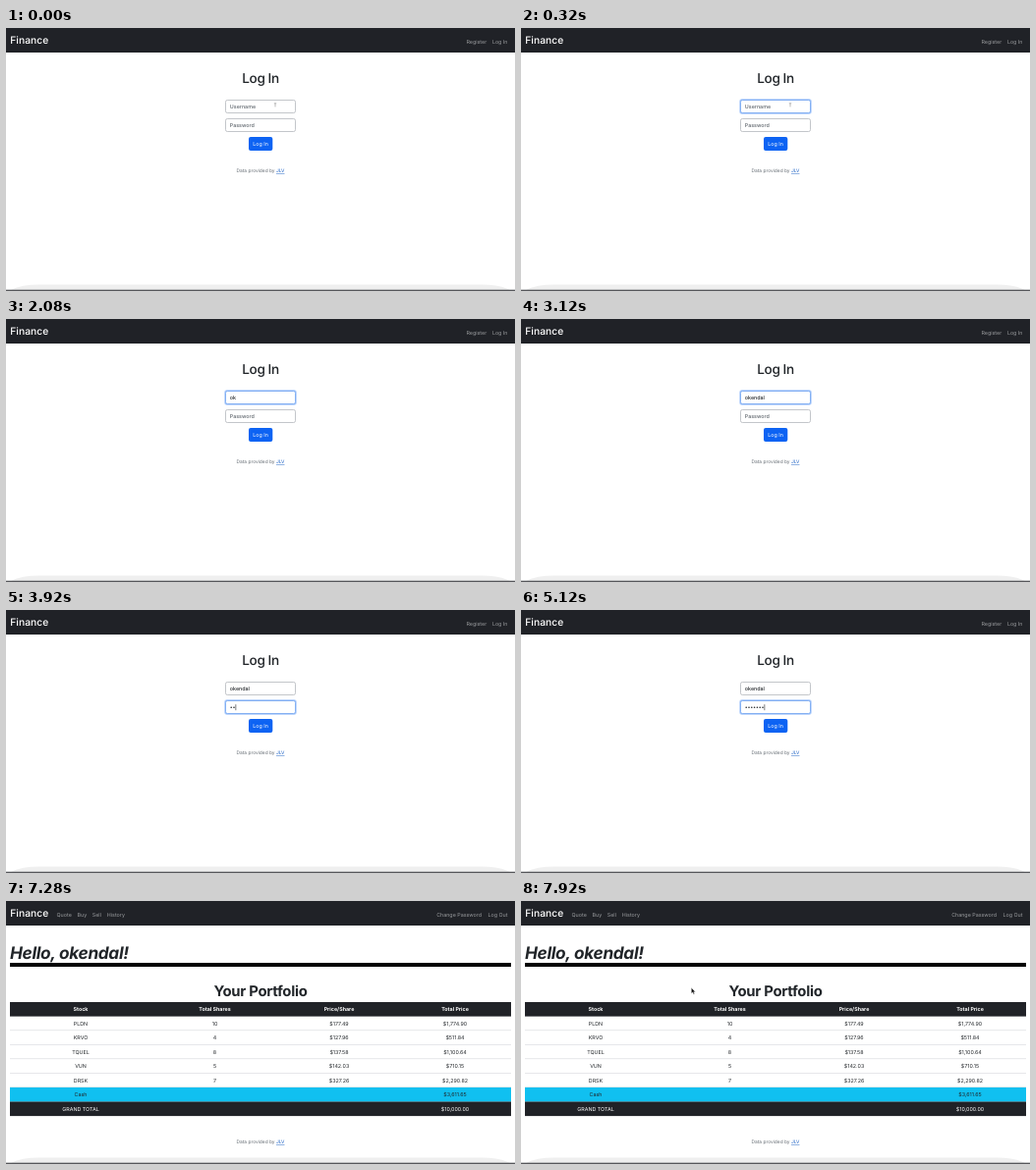
An HTML page for the animation above (8000 ms loop, 518x268 px).

```html
<!DOCTYPE html>
<html lang="en">
<head>
<meta charset="utf-8">
<title>Finance</title>
<style>
  html, body { margin: 0; width: 100%; height: 100%; overflow: hidden; background: #fff; }
  svg { display: block; width: 518px; height: 268px; }
  text { font: 400 5.35px Inter, Roboto, sans-serif; fill: #212529; text-rendering: geometricPrecision; white-space: pre; }
  .nav { fill: #9a9c9f; }
  .brand { font-size: 10.3px; font-weight: 500; fill: #fff; }
  .title { font-size: 13.6px; font-weight: 500; letter-spacing: -.03em; }
  .hello { font-size: 17.3px; font-weight: 700; font-style: italic; letter-spacing: -.02em; }
  .head { font-size: 14.9px; font-weight: 700; letter-spacing: -.02em; }
  .field { font-weight: 500; }
  .hint { fill: #5d646b; font-weight: 500; }
  .th { fill: #fff; font-weight: 700; }
  .light { fill: #fff; }
  .small { font-size: 4.85px; fill: #656c73; }
  .link { fill: #1a5fc4; text-decoration: underline; }
</style>
</head>
<body>
<svg id="stage" viewBox="0 0 518 268"></svg>
<script>
const LOOP = 8000, STEP = 80;
const USER = 'okendal', DARK = '#202227';
const stage = document.getElementById('stage');

function add(parent, tag, attrs, content = '') {
  const el = document.createElementNS('http://www.w3.org/2000/svg', tag);
  for (const key in attrs) el.setAttribute(key, attrs[key]);
  el.textContent = content;
  parent.append(el);
  return el;
}
const group = () => add(stage, 'g', {});
const rect = (g, x, y, width, height, fill, rx = 0) =>
  add(g, 'rect', { x, y, width, height, fill, rx });
const label = (g, x, y, cls, content, anchor = 'start') =>
  add(g, 'text', { x, y, class: cls, 'text-anchor': anchor }, content);
const show = (el, on) => el.setAttribute('visibility', on ? 'visible' : 'hidden');

function footer(g, y) {
  const line = label(g, 259, y, 'small', 'Data provided by ', 'middle');
  add(line, 'tspan', { class: 'link' }, 'JLV');
}

function input(g, y) {
  const ring = rect(g, 222.3, y - .7, 73.4, 15.4, '#a9c9fb', 2.6);
  const box = rect(g, 223.5, y + .5, 71, 13, '#fff', 1.8);
  box.setAttribute('stroke-width', .8);
  return amount => {
    ring.setAttribute('opacity', amount);
    box.setAttribute('stroke', amount > .5 ? '#6fa2f0' : '#b4b8bd');
  };
}

// Shared frame
rect(stage, 0, 0, 518, 25, DARK);
label(stage, 4.3, 16.2, 'brand', 'Finance');
add(stage, 'path', { d: 'M5 267Q16 261.6 34 261.6H484Q502 261.6 513 267Z', fill: '#efefef' });
rect(stage, 0, 266.7, 518, 1.3, '#55565a');

// Log in page
const login = group();
label(login, 468.5, 15.5, 'nav', 'Register');
label(login, 510.5, 15.5, 'nav', 'Log In', 'end');
label(login, 259, 56, 'title', 'Log In', 'middle');
const focusUser = input(login, 73);
const focusPass = input(login, 92);
const userHint = label(login, 227.8, 82, 'hint', 'Username');
const userText = label(login, 227.8, 82, 'field', '');
const passHint = label(login, 227.8, 101.2, 'hint', 'Password');
const dots = Array.from({ length: 9 }, (_, i) =>
  add(login, 'circle', { cx: 229.2 + i * 2.8, cy: 99.3, r: .8, fill: '#212529' }));
const caret = rect(login, 0, 96.2, .6, 6, '#212529');
rect(login, 247, 111, 24.3, 14, '#0d63f3', 2);
label(login, 259.1, 120, 'light', 'Log In', 'middle');
footer(login, 147);

// Portfolio page
const home = group();
[[51.5, 'Quote'], [72.6, 'Buy'], [87.8, 'Sell'], [102.8, 'History']]
  .forEach(([x, name]) => label(home, x, 15.5, 'nav', name));
label(home, 484, 15.5, 'nav', 'Change Password', 'end');
label(home, 510.5, 15.5, 'nav', 'Log Out', 'end');
label(home, 4, 59.2, 'hello', `Hello, ${USER}!`);
rect(home, 4, 63, 510, 4, '#000');
label(home, 259, 96.6, 'head', 'Your Portfolio', 'middle');

const ROW = 14.5, TOP = 103;
const columns = [76, 212.5, 339, 457];
const rows = [
  ['Stock', 'Total Shares', 'Price/Share', 'Total Price'],
  ['PLDN', '10', '$177.49', '$1,774.90'],
  ['KRVO', '4', '$127.96', '$511.84'],
  ['TQUEL', '8', '$137.58', '$1,100.64'],
  ['VUN', '5', '$142.03', '$710.15'],
  ['DRSK', '7', '$327.26', '$2,290.82'],
  ['Cash', '', '', '$3,611.65'],
  ['GRAND TOTAL', '', '', '$10,000.00']
];
const fills = { 0: DARK, 6: '#10c0f0', 7: DARK };
const styles = { 0: 'th', 7: 'light' };
rows.forEach((cells, i) => {
  const y = TOP + i * ROW;
  if (fills[i]) rect(home, 4, y, 510, ROW + .1, fills[i]);
  else rect(home, 4, y + ROW - .5, 510, .6, '#d5d8dc');
  cells.forEach((cell, c) => label(home, columns[c], y + 9.1, styles[i] || '', cell, 'middle'));
});
footer(home, 247);

// Pointers
const beam = add(stage, 'path', {
  d: 'M272.8 76.8H275.2M274 76.8V80.4', stroke: '#777', 'stroke-width': .5, fill: 'none'
});
const arrow = add(stage, 'path', {
  d: 'M0 0V6L1.4 4.8L2.4 7L3.4 6.5L2.4 4.4H4.2Z',
  fill: '#111', stroke: '#fff', 'stroke-width': .45
});

// [time, x, y]
const leave = [[720, 274, 78], [880, 266, 98], [1040, 258, 111], [1200, 284, 88],
  [1360, 312.3, 61.8], [1520, 390, 36], [1680, 512, 3]];
const arrive = [[7360, 240, 118], [7520, 212, 108], [7680, 191, 98],
  [7840, 177, 91], [7920, 173.3, 88.3]];

function along(path, t) {
  if (t < path[0][0] || t > path[path.length - 1][0]) return null;
  const i = Math.max(1, path.findIndex(p => p[0] >= t));
  const [t0, x0, y0] = path[i - 1], [t1, x1, y1] = path[i];
  const k = (t - t0) / (t1 - t0);
  return [x0 + (x1 - x0) * k, y0 + (y1 - y0) * k];
}

const ramp = (t, from) => Math.min(1, Math.max(0, (t - from) / 160));
const within = (t, spans) => spans.some(([a, b]) => t >= a && t < b);
const dotTimes = [3680, 3840, 4000, 4160, 4400, 4640, 5120, 5520, 5600];
const caretOn = [[3360, 4800], [5120, 6080], [6240, 6640]];

function draw(time) {
  const t = Math.floor(time / STEP) * STEP;
  show(login, t < 7280);
  show(home, t >= 7280);

  const passFocus = ramp(t, 3120);
  focusUser(ramp(t, 160) * (1 - passFocus));
  focusPass(passFocus);

  const typed = t < 1840 ? 0 : Math.floor((t - 1840) / 160) + 1;
  userText.textContent = USER.slice(0, typed);
  userHint.setAttribute('opacity', typed ? 0 : 1);

  let count = dotTimes.filter(d => t >= d).length;
  if (t >= 6240) count = 8;
  passHint.setAttribute('opacity', count ? 0 : 1);
  dots.forEach((dot, i) => dot.setAttribute('opacity', i < count ? 1 : 0));
  caret.setAttribute('x', 228 + count * 2.8);
  caret.setAttribute('opacity', within(t, caretOn) ? 1 : 0);

  show(beam, t < 720);
  const spot = along(leave, t) || along(arrive, t);
  show(arrow, spot);
  if (spot) arrow.setAttribute('transform', `translate(${spot})`);
}

const start = performance.now();
function tick() {
  draw((performance.now() - start) % LOOP);
  requestAnimationFrame(tick);
}
tick();
</script>
</body>
</html>
```
